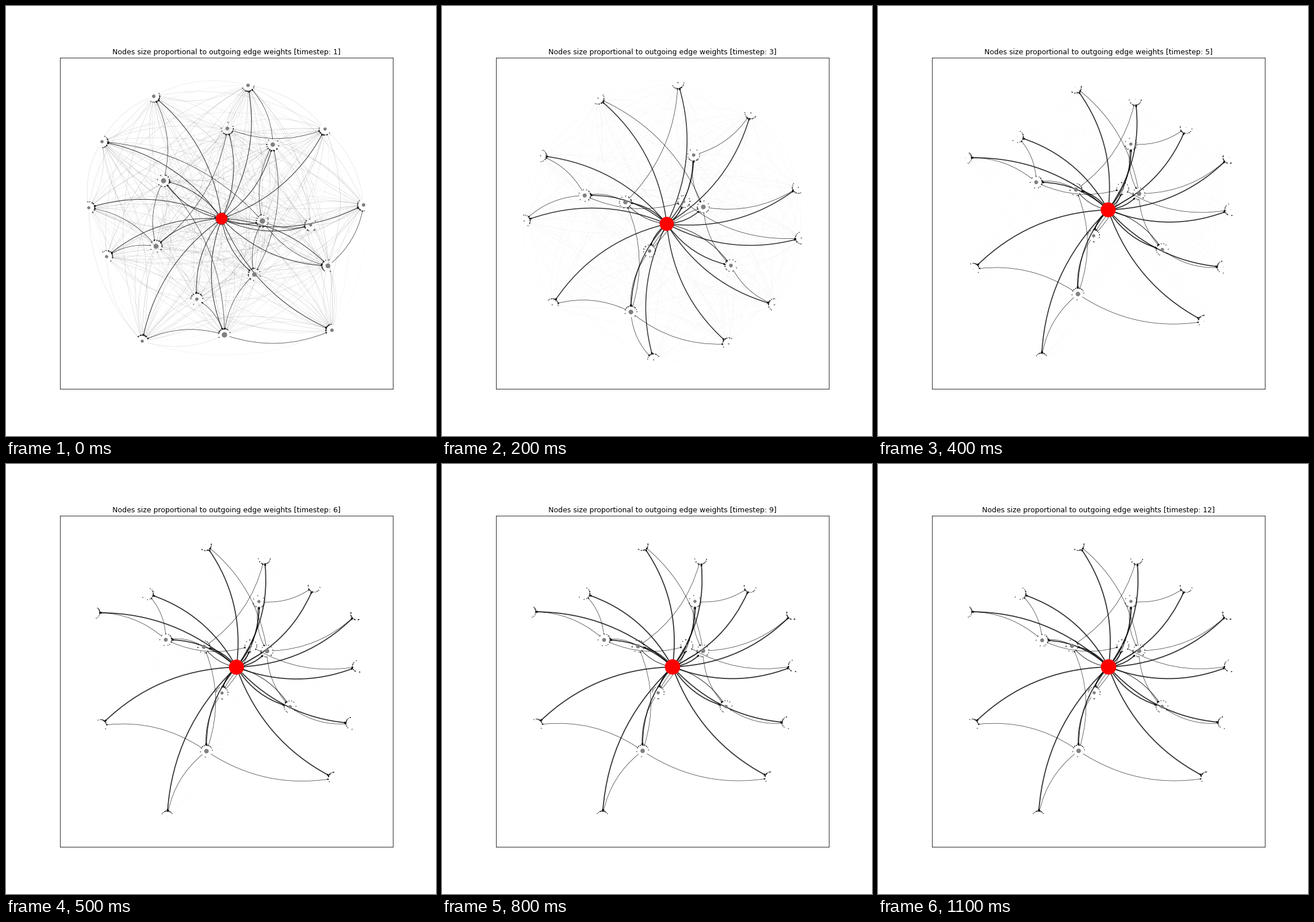
A matplotlib script that plays this animation: 748 by 748 pixels, repeating every 1200 ms.

```python
import numpy as np
import matplotlib.pyplot as plt
from matplotlib.animation import FuncAnimation
from matplotlib.collections import PathCollection, PolyCollection
from matplotlib.path import Path

STAGE, DPI, STEPS = 748, 74.8, 12
PT = DPI / 72
RAD, GAP, HEAD = 0.2, 8.66 * PT, 5 * PT
INK = (0, 0, 0, 0.8)

# Each node: where it starts and where it settles, in pixels.
NODES = {
    "hub": ((375, 370), (401, 353)),
    "a": ((261, 418), (282, 306)), "b": ((274, 304), (341, 317)),
    "c": ((464, 241), (440, 239)), "d": ((385, 213), (426, 316)),
    "e": ((446, 374), (454, 325)), "f": ((432, 467), (376, 398)),
    "g": ((560, 452), (494, 422)), "h": ((380, 572), (349, 499)),
    "1": ((167, 236), (348, 140)), "2": ((257, 157), (450, 164)),
    "3": ((421, 138), (536, 213)), "4": ((530, 381), (610, 260)),
    "5": ((555, 214), (613, 351)), "6": ((622, 346), (602, 450)),
    "7": ((567, 564), (572, 546)), "8": ((332, 510), (279, 614)),
    "9": ((237, 583), (164, 454)), "10": ((175, 436), (153, 257)),
    "11": ((144, 351), (247, 225)),
}
RING = np.radians([-28, 6, 39, 76, 97, 127, 152, 184, 233, 270, 298])
LINKS = ("e-1 b-2 c-3 e-4 d-5 g-6 h-7 h-8 h-9 a-10 a-11 "
         "b-a h-b a-d c-e e-f f-c f-h e-g").split()
BACK = ["b-hub", "g-hub"]

names = list(NODES)
n, core = len(names), len(names) - len(RING)
START, SETTLED = np.array(list(NODES.values()), float).transpose(1, 0, 2)
pairs = [(i, j) for i in range(n) for j in range(n) if i != j]
SRC, DST = np.array(pairs).T
labels = [f"{names[i]}-{names[j]}" for i, j in pairs]
is_link, is_back = np.isin(labels, LINKS), np.isin(labels, BACK)
weak = np.random.default_rng(4).uniform(0.01, 0.14, len(pairs))


def ring_layout(t):
    """Core stretched around the hub, leaves on a turning ring."""
    pos = SETTLED[0] + (SETTLED - SETTLED[0]) * (1.2, 1.05) + (-10, 26)
    turn = RING + np.radians(14 * (t - 3))
    pos[core:] = (385, 374) + 242 * np.column_stack((np.sin(turn), -np.cos(turn)))
    return pos


def layout(t):
    if t == 1:
        return START
    if t <= 3:
        return ring_layout(t)
    pos = SETTLED + (ring_layout(3) - SETTLED) * np.exp(-1.4 * (t - 3))
    creep = (pos[2] - pos[1]) * 0.02 * (t - 9)
    pos[1] += creep
    pos[2] -= creep
    return pos


def widths(t):
    w = weak * np.exp(-0.85 * (t - 1))
    w[is_link] = 0.7
    w[is_back] = 1.0
    w[SRC == 0] = 1.75 - 0.75 * np.exp(-0.5 * (t - 1))
    return w


def bezier(p0, c, p1, u):
    return (1 - u) ** 2 * p0 + 2 * u * (1 - u) * c + u ** 2 * p1


def clip_at(p0, c, p1):
    """Curve parameter at which the path leaves the gap around p0."""
    lo, hi = np.zeros((len(p0), 1)), np.full((len(p0), 1), 0.5)
    for _ in range(18):
        mid = (lo + hi) / 2
        far = np.linalg.norm(bezier(p0, c, p1, mid) - p0, axis=1, keepdims=True) > GAP
        lo, hi = np.where(far, lo, mid), np.where(far, mid, hi)
    return lo


def arrows(pos, w):
    p0, p1 = pos[SRC], pos[DST]
    d = p1 - p0
    c = (p0 + p1) / 2 + RAD * np.column_stack((-d[:, 1], d[:, 0]))
    u, v = clip_at(p0, c, p1), 1 - clip_at(p1, c, p0)
    tail, tip = bezier(p0, c, p1, u), bezier(p0, c, p1, v)
    ctrl = (1 - u) * (1 - v) * p0 + (u + v - 2 * u * v) * c + u * v * p1
    ahead = tip - ctrl
    ahead /= np.linalg.norm(ahead, axis=1, keepdims=True) + 1e-9
    side = np.column_stack((-ahead[:, 1], ahead[:, 0])) * 0.2 * HEAD
    tip = tip - ahead * w[:, None] * 1.118 * PT
    base = tip - ahead * 0.4 * HEAD
    codes = [Path.MOVETO, Path.CURVE3, Path.CURVE3]
    paths = [Path(q, codes) for q in np.stack((tail, ctrl, tip), axis=1)]
    return paths, np.stack((base + side, tip, base - side), axis=1)


fig, ax = plt.subplots(figsize=(STAGE / DPI, STAGE / DPI), dpi=DPI)
ax.set(xlim=(0.125 * STAGE, 0.9 * STAGE), ylim=(0.89 * STAGE, 0.12 * STAGE),
       xticks=[], yticks=[])
title = ax.set_title("")
lines = PathCollection([], facecolors="none", edgecolors=INK, zorder=1)
tips = PolyCollection([], facecolors=INK, edgecolors=INK, joinstyle="miter", zorder=1.1)
for coll in (lines, tips):
    coll.set_transform(ax.transData)
    ax.add_collection(coll, autolim=False)
dots = ax.scatter(*START.T, c=["red"] + ["gray"] * (n - 1), linewidths=0, zorder=2)
ax.autoscale(False)


def update(k):
    t = k + 1
    pos, w = layout(t), widths(t)
    paths, heads = arrows(pos, w)
    lines.set_paths(paths)
    tips.set_verts(heads)
    for coll in (lines, tips):
        coll.set_linewidths(w)
    dots.set_offsets(pos)
    dots.set_sizes(20 * np.bincount(SRC, weights=w))
    title.set_text(f"Nodes size proportional to outgoing edge weights [timestep: {t}]")
    return lines, tips, dots, title


anim = FuncAnimation(fig, update, frames=STEPS, interval=100, repeat=True)
plt.show()
```
